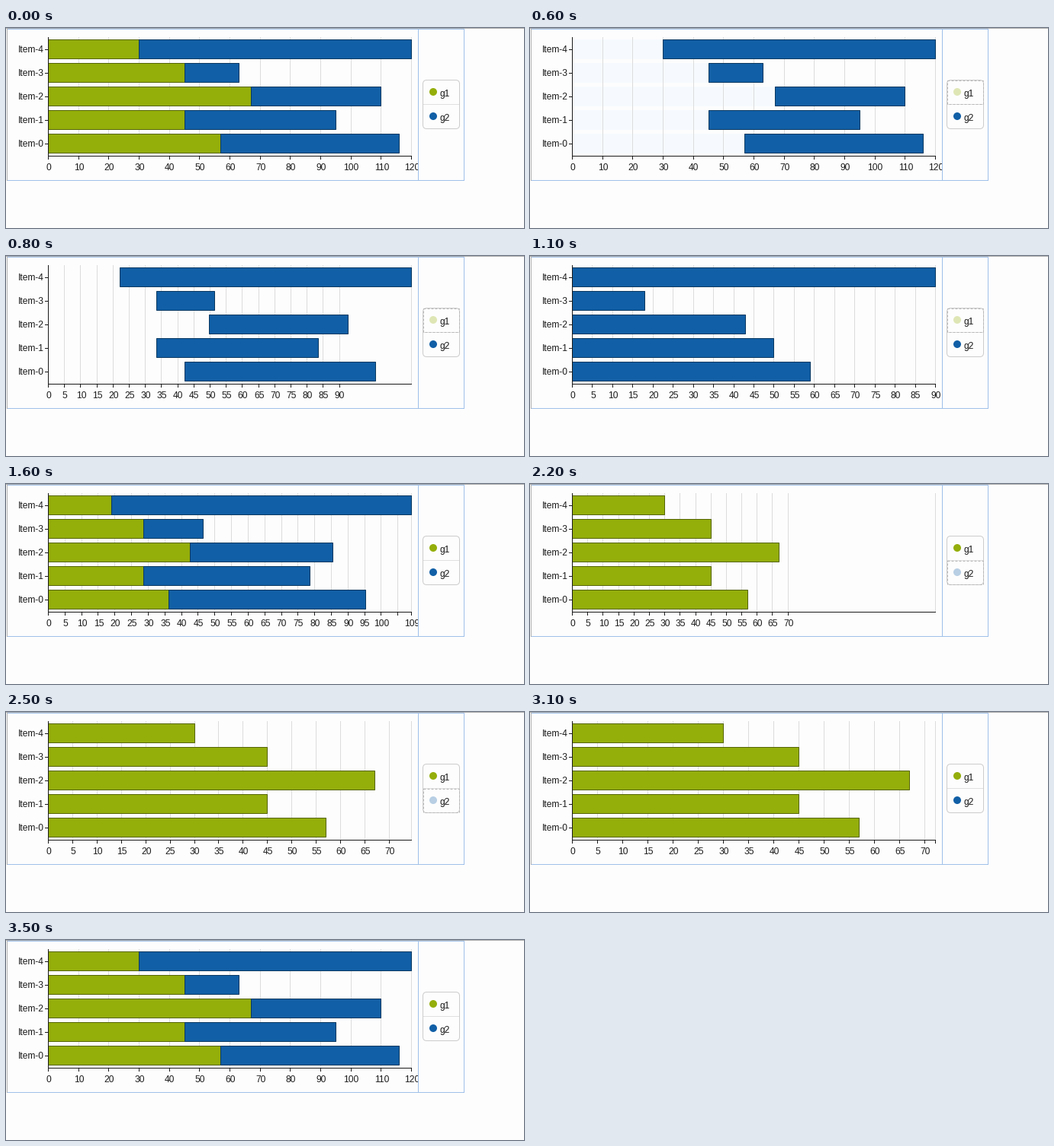
Recreate the animation shown at these times as a matplotlib script. Size 679x263 px, loop 4200 ms.

```python
import matplotlib.pyplot as plt
from matplotlib.animation import FuncAnimation
from matplotlib.patches import Circle, FancyBboxPatch, Rectangle

W, H, DPI = 679, 263, 100
PX = 72 / DPI                      # one pixel in points
STEP_MS, FRAMES = 100, 42

BG, INK, GRID = "#fdfdfd", "#1a1a1a", "#dcdcdc"
PANEL, SHADE, GHOST = "#9fc0ea", "#b0b0b0", "#f6fafe"
FILL = ("#94ae0a", "#115fa6")
EDGE = ("#566506", "#0a3961")
DIM = ("#dfe6b5", "#b8cfe4")

G1 = (57, 45, 67, 45, 30)
G2 = (59, 50, 43, 18, 90)
FULL = 120                         # axis end with both series
WITHOUT = (90, 70)                 # axis end while g1 or g2 is off

# Strokes snap to the pixel whose index is given.
LEFT, RIGHT, TOP, BASE = 55, 531, 12, 168

plt.rcParams["font.family"] = "Liberation Sans"
fig = plt.figure(figsize=(W / DPI, H / DPI), dpi=DPI, facecolor=BG)
ax = fig.add_axes([0, 0, 1, 1])


def ease(step):
    """Quadratic ease in and out over five steps."""
    if step < 0:
        return 0.0
    t = min(1.0, 0.146 + 0.2135 * step)
    return 2 * t * t if t < 0.5 else 1 - 2 * (1 - t) ** 2


def line(x0, y0, x1, y1, color=INK):
    ax.plot([x0, x1], [y0, y1], color=color, lw=PX, zorder=1,
            solid_capstyle="projecting")


def box(x, y, w, h, fill, edge="none", **style):
    ax.add_patch(Rectangle((x, y), w, h, facecolor=fill, edgecolor=edge,
                           lw=PX, zorder=1, **style))


def label(x, y, text, ha="center"):
    ax.text(x, y, text, color=INK, fontsize=12 * PX, ha=ha,
            va="baseline", zorder=1)


def phase(i):
    """Toggled series, its share of full size, kind of change and its age."""
    for series, hide, show in ((0, 6, 14), (1, 21, 31)):
        if hide <= i < show:
            return series, 1 - ease(i - hide - 1), "hide", i - hide
        if show <= i < show + 4:
            return series, ease(i - show), "show", i - show
    return None, 1.0, "rest", 0


def ticks(top, kind, share, low):
    """Tick values, and whether the axis end carries its own tick."""
    if share == 1:
        return list(range(0, FULL + 1, 10)), False
    if kind == "hide":
        return list(range(0, low + 1, 5)), False
    return list(range(0, int(top) + 1, 5)), True


def draw_axes(values, end_tick, top, to_x):
    if end_tick:
        values = values + [top]
    free = 0
    for v in values:
        x = to_x(v)
        line(x, BASE, x, 172)
        text = f"{v:.0f}"
        half = 3.4 * len(text)
        if x + 1 - half > free:
            label(x + 1, 187, text)
            free = x + 1 + half + 3
    for n in range(5):
        y = 152 - 31 * n
        line(51, y, LEFT, y)
        label(49.5, y + 4, f"Item-{n}", "right")
    line(LEFT, TOP, LEFT, 172)
    line(LEFT, BASE, RIGHT, BASE)


def draw_legend(off):
    ax.add_patch(FancyBboxPatch((550.5, 72.5), 40, 56, facecolor=BG,
                                boxstyle="round,pad=4,rounding_size=5",
                                edgecolor="#cccccc", lw=PX, zorder=1))
    line(547, 100, 593, 100, "#e0e0e0")
    for s in (0, 1):
        y = 84 + 32 * s
        if s == off:
            box(547, y - 15, 47, 31, "none", "#b8b8b8",
                linestyle=(0, (3, 2)))
        ax.add_patch(Circle((560, y), 5, lw=0, zorder=1,
                            facecolor=(DIM if s == off else FILL)[s]))
        label(568.5, y + 6, f"g{s + 1}", "left")


def draw_panel():
    """Frame lines; the legend side covers overlong axis labels."""
    box(540, 1, 61, 199, BG)
    line(0, 0, W, 0, SHADE)
    line(1, 1, 600, 1, PANEL)
    line(1, 200, 600, 200, PANEL)
    line(1, 1, 1, 200, SHADE)
    for x in (540, 600):
        line(x, 1, x, 200, PANEL)


def draw(i):
    ax.cla()
    ax.set(xlim=(0, W), ylim=(H, 0))
    ax.axis("off")

    series, share, kind, age = phase(i)
    low = FULL if series is None else WITHOUT[series]
    top = low + (FULL - low) * share
    sizes = [share if s == series else 1 for s in (0, 1)]
    hidden = series if kind == "hide" or age == 0 else None

    def to_x(v):
        return LEFT + v / top * (RIGHT - LEFT)

    bars = []
    for n, pair in enumerate(zip(G1, G2)):
        start = 0
        for s in (0, 1):
            end = start + pair[s] * sizes[s]
            bars.append((s, to_x(start), to_x(end), 139 - 31 * n))
            start = end

    # a faint trace remains for one step after a series is switched off
    if kind == "hide" and age == 0:
        for s, x0, x1, y in bars:
            if s == series:
                box(x0, y, x1 - x0, 26, GHOST)

    values, end_tick = ticks(top, kind, share, low)
    for v in values + [top]:
        line(to_x(v), TOP, to_x(v), BASE, GRID)
    for s, x0, x1, y in bars:
        if s != hidden:
            box(x0, y, x1 - x0, 25, FILL[s], EDGE[s])
    draw_axes(values, end_tick, top, to_x)
    draw_panel()
    draw_legend(series if kind == "hide" else None)
    return []


anim = FuncAnimation(fig, draw, frames=FRAMES, interval=STEP_MS,
                     init_func=lambda: draw(0), repeat=True, blit=False)
plt.show()
```
